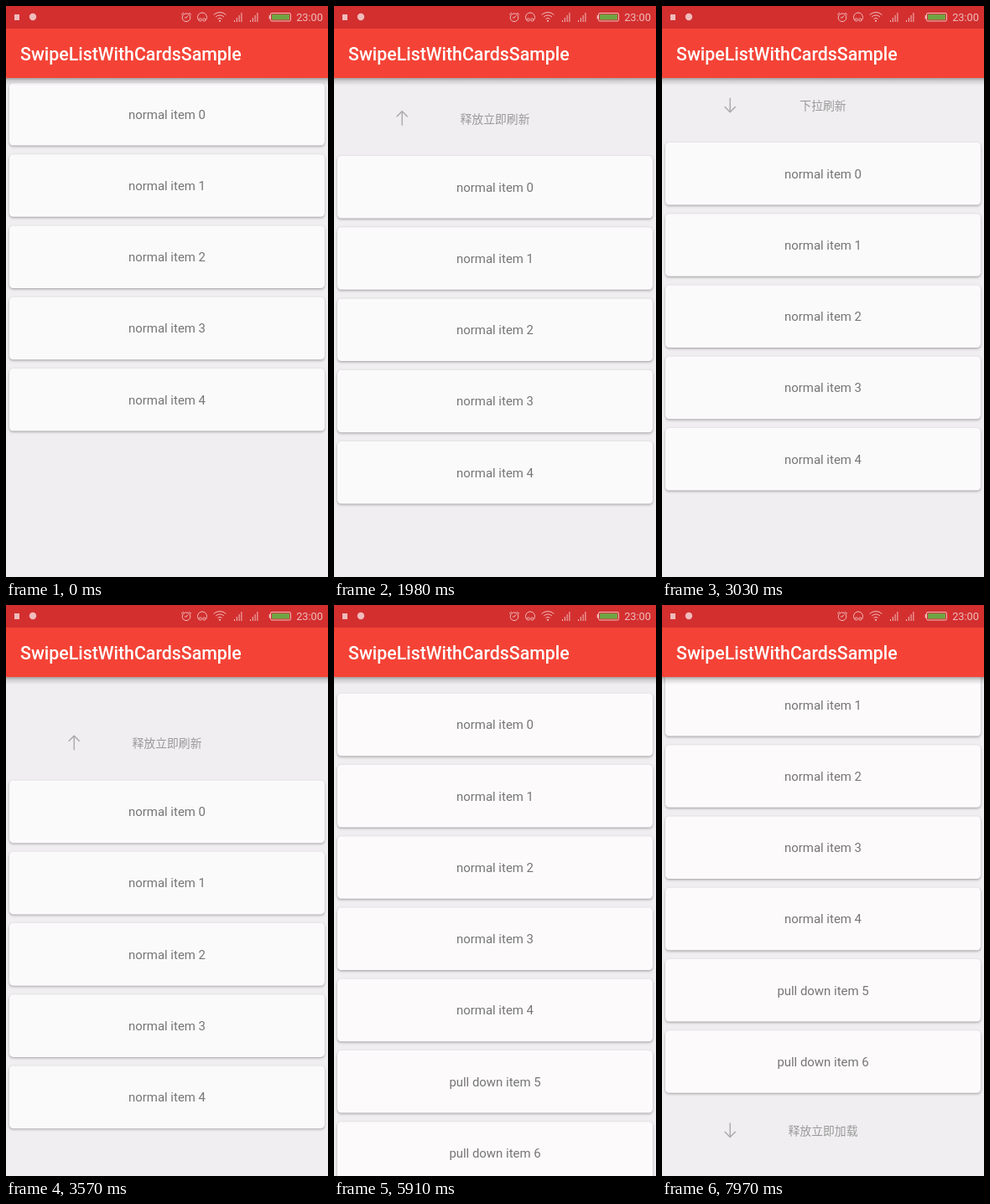
Write an HTML page with a canvas that moves like this. It is 384x682 px and loops after 8 s.

```html
<!DOCTYPE html>
<html lang="zh-CN">
<head>
<meta charset="utf-8">
<title>Pull list</title>
<style>
  html, body { margin: 0; width: 100%; height: 100%; overflow: hidden; background: #f0eef0; }
  canvas { display: block; }
</style>
</head>
<body>
<canvas id="stage" width="384" height="682"></canvas>
<script>
const ctx = document.getElementById('stage').getContext('2d');
const LOOP = 8000, FRAME = 133, PHASE = 488;
const PITCH = 85.25, REST = 74;
const RELEASED = 3940, DONE = 5480, LOADED = 5650, SCROLL = 7100;
const FONT = 'Roboto, "Noto Sans CJK SC", "Noto Sans CJK", sans-serif';

const easeOut = p => 1 - (1 - p) ** 2;
const easeInOut = p => (1 - Math.cos(Math.PI * p)) / 2;
const clamp = v => Math.min(1, Math.max(0, v));

// Each gesture adds its distance to the list offset
const MOVES = [
  { start: 410, end: 1285, by: 131.3, ease: easeOut },
  { start: 1390, end: 2450, by: -81.3, ease: easeInOut },
  { start: 2620, end: 3700, by: 71, ease: easeInOut },
  { start: 3880, end: 4350, by: REST - 121, ease: easeInOut },
  { start: 5550, end: 5910, by: -REST, ease: easeInOut },
  { start: 7005, end: 7936, by: -95.3, ease: easeOut }
];

function offsetAt(t) {
  return MOVES.reduce((sum, { start, end, by, ease }) =>
    sum + by * ease(clamp((t - start) / (end - start))), 0);
}

function text(str, x, y, size, color, align = 'center', weight = 400) {
  ctx.font = `${weight} ${size}px ${FONT}`;
  ctx.textAlign = align;
  ctx.fillStyle = color;
  ctx.fillText(str, x, y);
}

function line(...points) {
  ctx.beginPath();
  points.forEach(([x, y]) => ctx.lineTo(x, y));
  ctx.stroke();
}

function arc(x, y, r, from = 0, to = 2 * Math.PI) {
  ctx.beginPath();
  ctx.arc(x, y, r, from, to);
}

function card(y, label, fill) {
  ctx.save();
  ctx.beginPath();
  ctx.roundRect(4, y, 376, 74.6, 4.5);
  ctx.fillStyle = fill;
  ctx.shadowColor = 'rgba(0,0,0,.32)';
  ctx.shadowBlur = 3;
  ctx.shadowOffsetY = 1.2;
  ctx.fill();
  ctx.restore();
  text(label, 192, y + 42.7, 14.93, '#757575');
}

function arrow(y, up) {
  const x = 81.2, d = up ? -1 : 1;
  ctx.strokeStyle = '#a9a7a9';
  ctx.lineWidth = 1.4;
  line([x, y - 8.5 * d], [x, y + 8.5 * d]);
  line([x - 6.5, y + 2 * d], [x, y + 8.5 * d], [x + 6.5, y + 2 * d]);
}

function spinner(y, t) {
  const spokes = 12, head = Math.floor((t - RELEASED) / 67) + 4;
  ctx.lineWidth = 1.9;
  for (let i = 0; i < spokes; i++) {
    const a = (head - i) * 2 * Math.PI / spokes, cos = Math.cos(a), sin = Math.sin(a);
    ctx.strokeStyle = `rgba(95,95,95,${0.65 * (1 - i / spokes)})`;
    line([80 + 5.5 * cos, y + 5.5 * sin], [80 + 11 * cos, y + 11 * sin]);
  }
}

function hint(label, y) {
  text(label, 192, y + 5.4, 13.87, '#999');
}

function header(offset, t) {
  const y = 47.3 + offset;
  if (t < RELEASED) {
    const ready = offset > REST;
    arrow(y, ready);
    hint(ready ? '释放立即刷新' : '下拉刷新', y);
  } else if (t < DONE) {
    spinner(y, t);
    hint('正在刷新...', y);
  } else {
    hint('刷新完成', y);
  }
}

function footer(offset) {
  const y = 722.4 + offset, ready = -offset > REST;
  arrow(y, !ready);
  hint(ready ? '释放立即加载' : '上拉加载', y);
}

function scrollbar(t) {
  ctx.fillStyle = `rgba(165,163,165,${clamp((7700 - t) / 250)})`;
  ctx.fillRect(380, 86, 4, 571);
}

function signal(x) {
  for (let i = 0; i < 4; i++) {
    const h = 2 + i * 3;
    ctx.fillRect(x + i * 2.8, 19 - h, 1, h);
  }
}

function statusBar() {
  const ink = '#f0bcbc';
  ctx.fillStyle = '#d32f2f';
  ctx.fillRect(0, 0, 384, 27);
  ctx.fillStyle = ctx.strokeStyle = ink;
  ctx.lineWidth = 1;
  ctx.fillRect(10, 10, 6, 7);
  arc(32, 13, 4.2); ctx.fill();

  // alarm
  arc(215, 13.8, 4.8); ctx.stroke();
  line([217, 11.5], [215, 14], [213, 14]);
  line([209, 10.5], [212, 8]);
  line([218, 8], [221, 10.5]);

  // headset
  arc(234, 13.5, 5.5, 0.75 * Math.PI, 2.25 * Math.PI); ctx.stroke();
  for (const x of [231.7, 236.3]) { arc(x, 16.5, 1.6); ctx.stroke(); }

  // wifi
  for (let r = 3.5; r < 11; r += 3.5) { arc(255, 18, r, -2.35, -0.79); ctx.stroke(); }
  arc(255, 17.8, 1.1); ctx.fill();

  signal(272);
  signal(291);

  // battery
  ctx.beginPath();
  ctx.roundRect(315.5, 8.5, 24, 9.5, 1.5);
  ctx.stroke();
  ctx.fillRect(313.7, 11, 1.5, 4.5);
  ctx.fillStyle = '#6fa544';
  ctx.fillRect(317, 10, 21, 6.5);
  text('23:00', 378, 18.4, 12.8, ink, 'right');
}

function appBar() {
  const shade = ctx.createLinearGradient(0, 86, 0, 95);
  shade.addColorStop(0, 'rgba(0,0,0,.32)');
  shade.addColorStop(0.4, 'rgba(0,0,0,.13)');
  shade.addColorStop(1, 'rgba(0,0,0,0)');
  ctx.fillStyle = shade;
  ctx.fillRect(0, 86, 384, 9);
  ctx.fillStyle = '#f44336';
  ctx.fillRect(0, 27, 384, 59);
  text('SwipeListWithCardsSample', 17, 64.6, 21.33, '#fff', 'left', 500);
}

function draw(t) {
  const offset = offsetAt(t), loaded = t >= LOADED;
  ctx.fillStyle = '#f0eef0';
  ctx.fillRect(0, 0, 384, 682);
  header(offset, t);
  for (let i = 0; i < (loaded ? 7 : 5); i++) {
    const label = `${i < 5 ? 'normal' : 'pull down'} item ${i}`;
    card(92 + offset + i * PITCH, label, loaded ? '#fcfafb' : '#fafafa');
  }
  if (t >= SCROLL) {
    footer(offset);
    scrollbar(t);
  }
  appBar();
  statusBar();
}

// The picture advances in even steps of about 7.5 per second
function tick() {
  const t = performance.now() % LOOP;
  draw(PHASE + Math.floor((t - PHASE) / FRAME) * FRAME);
  requestAnimationFrame(tick);
}
tick();
</script>
</body>
</html>
```
